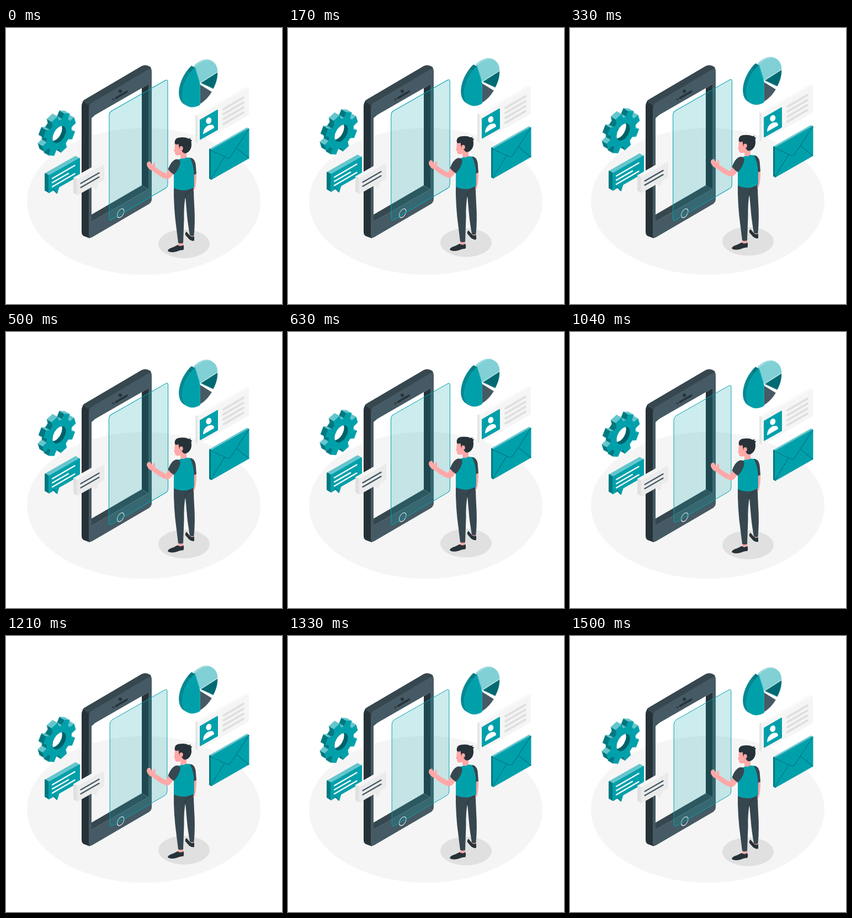
An HTML page for the animation above (1540 ms loop, 500 px wide and 500 px high).

```html
<!DOCTYPE html>
<html>
<head>
<meta charset="utf-8">
<style>
  html, body { margin: 0; width: 100%; height: 100%; overflow: hidden; background: #fff; }
  svg { display: block; width: 100vw; height: 100vh; }
</style>
</head>
<body>
<svg viewBox="0 0 500 500" stroke-linejoin="round" stroke-linecap="round">
  <ellipse cx="249.5" cy="314" rx="211.5" ry="133" fill="#f5f5f5"/>

  <g id="phone">
    <path fill="#263238" d="M137 142Q137 133 144 129L246 69Q254 65 262 71L155 163V352L152 381L141 377Q137 375 137 369Z"/>
    <path fill="#37474f" d="M139 133Q141 130 144 129L246 69Q254 65 262 71L264 77L151 141Z"/>
    <path fill="#455a64" fill-rule="evenodd" d="M150 146Q150 139 156 135L256 76Q264 71 264 80V310Q264 316 258 319.500L156 379Q150 382 150 375ZM155 165V351L258 292V102L158 159.500Q155 161 155 165Z"/>
    <path fill="#263238" d="M246 109L258 102V292L246 285Z"/>
    <path fill="#37474f" d="M155 338L246 285L258 292L155 351Z"/>
    <g fill="#263238">
      <circle cx="207" cy="114.500" r="3"/>
      <circle cx="194.300" cy="129.300" r="1.600"/>
      <path stroke="#263238" stroke-width="3.400" d="M199 127L219.500 115"/>
    </g>
    <circle r="7.200" fill="none" stroke="#f0f0f0" stroke-width="1.200" transform="matrix(.866 -.5 0 1 207.700 335.500)"/>
  </g>

  <path id="glass" fill="#00a0ab" fill-opacity=".2" stroke="#00a0ab" d="M187 159Q187 153 191 150.500L288.500 95Q293 92.500 293 97.500V282.500Q293 288 289 290.300L191.500 347Q187 349.500 187 344Z"/>

  <g id="float">
    <g id="solids"></g>

    <g transform="matrix(.866 -.5 0 1 96.500 193)">
      <clipPath id="hole"><circle r="14"/></clipPath>
      <circle r="14" fill="#006068"/>
      <circle cx="-8" cy="-8" r="14" fill="#fff" clip-path="url(#hole)"/>
    </g>

    <g id="badge">
      <path fill="#00a0ab" stroke="#00a0ab" stroke-width="2" d="M352 167L383 149V184L352 201.500Z"/>
      <ellipse cx="367.300" cy="168" rx="4.800" ry="6" fill="#fff" transform="rotate(20 367.300 168)"/>
      <path fill="#fff" d="M357 192.500Q357 181.500 366 176.500Q377 172.500 377 181Z"/>
      <path stroke="#e0e0e0" stroke-width="4" d="M394 147L430 126M394 156L430 135M394 165L430 144M394 174L430 153"/>
    </g>

    <path id="flap" fill="none" stroke="#007880" stroke-width="1.200" d="M371 221.500L400 235Q404 237.500 407 233L440 183M371 274L396 233.500M440 236L418 218"/>

    <path fill="#007880" d="M84 292L91 299.500L93 300L91 289Z"/>
    <path fill="#00a0ab" d="M86 291L93 300L98 283Z"/>
    <path stroke="#fff" stroke-width="2.400" d="M84 272.500L124.500 249M84 280L113 263.500M84 287.500L124.500 264"/>
    <path fill="#ebebeb" d="M155 286L163 293L168 281Z"/>
    <path stroke="#455a64" stroke-width="2.400" d="M135.500 281.500L168.500 262.500M135.500 289L168.500 270"/>

    <g id="person">
      <ellipse cx="322.500" cy="391" rx="46.500" ry="26" fill="#e0e0e0"/>
      <path fill="#ffa8a7" d="M333 372H340V381L333 379ZM313 386H321V396L312 395Z"/>
      <path fill="#263238" d="M327 369Q324 371 325 375L332 383Q338 387 341 385V377Q337 380 333 376ZM311 393Q316 397 321.500 393Q323 398 321.500 402Q316 402 309 405Q298 408 293 404Q293 400 303 397Z"/>
      <path fill="#37474f" d="M304 287L340 288Q340 305 341 320Q343 350 340.500 376Q337 378 333 375.500Q330 358 328.500 345L325 306Q322 322 322.500 345L321 389.500Q316 391 312 389.500L306.500 345Q304.500 325 304 305Z"/>
      <path fill="none" stroke="#263238" d="M325 308Q324 303 326 300L337 292"/>
      <path fill="#ffa8a7" d="M340 262H345Q345.500 280 342 292L339.500 296Z"/>
      <path fill="#ffa8a7" d="M296 252L304 263Q298 273 292 274Q280 271 266 259Q257 256 255 248Q255 241 261 242L265 249L268 243.500Q271 243 270 252Q283 261 290 264Z"/>
      <path fill="#00a0ab" d="M312 239Q321 233 333 235Q341 237 341 244V288Q324 299 304 290V262Q306 245 312 239Z"/>
      <path fill="#37474f" d="M293.500 256Q299 241 307 238Q317 236 315.500 246Q312 258 304 265.500Q298 262 293.500 256ZM333 235Q341 235 343.500 246L345 264L340.500 266Q340.500 248 333 235Z"/>
      <path fill="#ffa8a7" d="M306.500 208Q305 215 305.500 219L304 223L306 224.500Q305.500 231 311 231L316 230V235Q321 239 327 234V221L318 206Z"/>
      <path fill="#263238" d="M306 210Q304 200 314 198.500Q324 197 331 200.500L335 199.500L333.500 202L337 203L335.500 206Q338 220 328 226Q322 229 319 223L314 219L312.500 210Q309 212 306 210Z"/>
      <ellipse cx="317.500" cy="218" rx="3.200" ry="4" fill="#ffa8a7"/>
    </g>
  </g>
</svg>
<script>
const $ = id => document.getElementById(id);
const teal = '#00a0ab', deep = '#007880', pale = '#66c6cd';
let solids = '';

const polygon = (points, color, width = .5) => {
  solids += `<path fill="${color}" stroke="${color}" stroke-width="${width}" d="M${points.join('L')}Z"/>`;
};

// Extrudes a clockwise outline backwards; the edge normal picks the shade.
function prism(points, depth, face, up, side, width = .5) {
  const dx = -depth, dy = -depth * .577;
  const back = ([x, y]) => [x + dx, y + dy];
  points.forEach((p, i) => {
    const q = points[(i + 1) % points.length];
    const nx = q[1] - p[1], ny = p[0] - q[0];
    if (nx * dx + ny * dy > 0)
      polygon([p, q, back(q), back(p)], ny < -.6 * Math.hypot(nx, ny) ? up : side, width);
  });
  polygon(points, face, width);
}

// Polar point on the isometric wall plane.
const onWall = (cx, cy, r, a) =>
  [cx + .866 * r * Math.cos(a), cy + r * (Math.sin(a) - .5 * Math.cos(a))];

const slab = (x, y, w, h, depth, face, up, side) =>
  prism([[x, y], [x + w, y - w * .57], [x + w, y + h - w * .57], [x, y + h]], depth, face, up, side, 2);

function sector(cx, cy, r, from, to) {
  const points = [[cx, cy]];
  for (let i = 0; i <= 24; i++)
    points.push(onWall(cx, cy, r, (from + (to - from) * i / 24) * Math.PI / 180));
  return points;
}

const gear = [];
for (let i = 0; i < 8; i++)
  for (const [r, a] of [[26, -.26], [34.5, -.18], [34.5, .18], [26, .26]])
    gear.push(onWall(96.5, 193, r, i * Math.PI / 4 + .5 + a));
prism(gear, 9, teal, pale, deep);

polygon(sector(352, 103, 34, 46, 90), '#455a64');
polygon(sector(353.5, 99.5, 34, -3, 42), '#006a72');
prism(sector(352.5, 98.5, 35.5, -107, -3), 3, '#80d0d5', '#99d9dd', pale);
prism(sector(351.5, 102, 37, 90, 253), 6, teal, deep, '#008790');

slab(348, 161, 91, 48, 4, '#f5f5f5', '#fafafa', '#e6e6e6');
slab(372, 221.5, 67.5, 52.5, 3, teal, pale, deep);
slab(78, 268, 55, 30, 7, teal, pale, deep);
slab(129.5, 275.5, 47.5, 26.5, 6.5, '#ebebeb', '#f5f5f5', '#e0e0e0');
$('solids').innerHTML = solids;

const pulse = [[0, 1], [550, 1.012], [830, 1], [1060, .978], [1540, .978]];
function glassScale(t) {
  const i = pulse.findIndex(key => key[0] > t);
  const [t0, s0] = pulse[i - 1], [t1, s1] = pulse[i];
  return s0 + (s1 - s0) * (t - t0) / (t1 - t0);
}

const start = performance.now();
function draw() {
  const t = (performance.now() - start) % 1540;
  const lift = 10 * Math.abs((t + 30) % 1500 / 750 - 1) - 9.6;
  $('float').setAttribute('transform', `translate(0 ${lift})`);
  $('glass').setAttribute('transform', `translate(240 221) scale(${glassScale(t)}) translate(-240 -221)`);
  requestAnimationFrame(draw);
}
draw();
</script>
</body>
</html>
```
